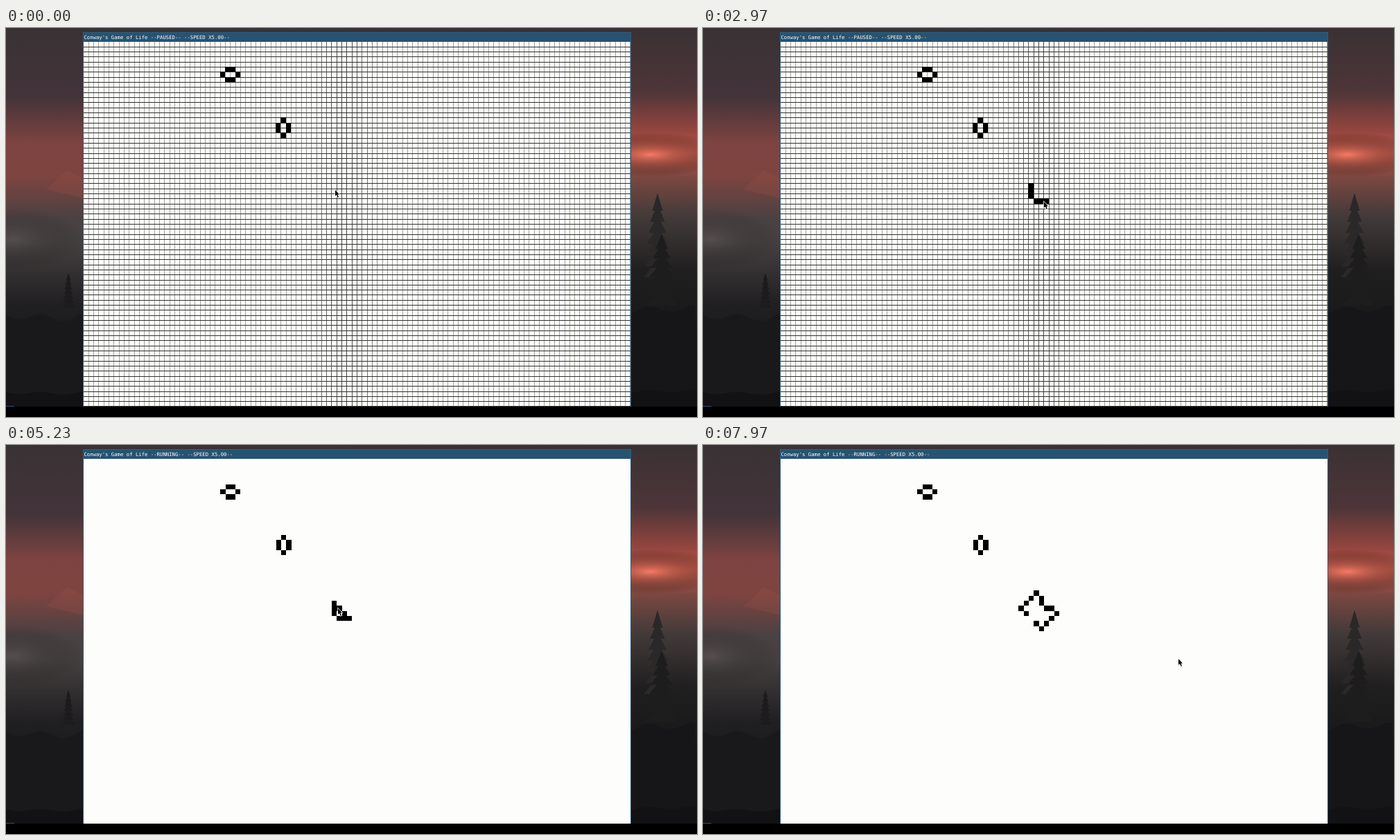
An HTML page with a canvas that plays this animation: 997 by 562 pixels, repeating every 8 s.

```html
<!DOCTYPE html>
<html lang="en">
<head>
<meta charset="utf-8">
<title>Game of Life</title>
<style>
  html, body { margin: 0; width: 100%; height: 100%; overflow: hidden; background: #000; }
  canvas { display: block; width: 997px; height: 562px; }
</style>
</head>
<body>
<canvas id="stage" width="997" height="562"></canvas>
<script>
const ctx = document.getElementById('stage').getContext('2d');

const LOOP = 8000, RUN_AT = 5100, STEP = 200, MOVE = 300;
const COLS = 108, ROWS = 72;
const LEFT = 112, TOP = 20, RIGHT = 901, BOTTOM = 547;
const CELL_W = (RIGHT - LEFT) / COLS, CELL_H = (BOTTOM - TOP) / ROWS;

// Stops of the pointer; a click fills the cell below it
const stops = [
  { t: 0, x: 475, y: 234 },
  { t: 500, x: 475, y: 228, click: true },
  { t: 850, x: 475, y: 235, click: true },
  { t: 1250, x: 475, y: 242, click: true },
  { t: 1600, x: 475, y: 249 },
  { t: 2000, x: 481, y: 250, click: true },
  { t: 2400, x: 487, y: 250, click: true },
  { t: 2800, x: 492, y: 251, click: true },
  { t: 3650, x: 487, y: 243, click: true },
  { t: 4250, x: 479, y: 236, click: true },
  { t: 6200, x: 686, y: 309 },
];

// A beehive is a ring of six cells, lying or standing
function beehive(x, y, standing) {
  const ring = [[1, 0], [2, 0], [0, 1], [3, 1], [1, 2], [2, 2]];
  return ring.map(([a, b]) => standing ? `${x + b},${y + a}` : `${x + a},${y + b}`);
}

function cellUnder({ x, y }) {
  return `${Math.floor((x - LEFT) / CELL_W)},${Math.floor((y - TOP) / CELL_H)}`;
}

function pausedCells(t) {
  const clicked = stops.filter(s => s.click && s.t <= t).map(cellUnder);
  return new Set([...beehive(27, 5), ...beehive(38, 15, true), ...clicked]);
}

function nextGeneration(cells) {
  const counts = new Map();
  for (const cell of cells) {
    const [x, y] = cell.split(',').map(Number);
    for (let dx = -1; dx <= 1; dx++)
      for (let dy = -1; dy <= 1; dy++) {
        if (!dx && !dy) continue;
        const key = `${x + dx},${y + dy}`;
        counts.set(key, (counts.get(key) || 0) + 1);
      }
  }
  return new Set([...counts.keys()].filter(key =>
    counts.get(key) === 3 || counts.get(key) === 2 && cells.has(key)));
}

const generations = [pausedCells(RUN_AT)];
while (generations.length <= (LOOP - RUN_AT) / STEP) generations.push(nextGeneration(generations.at(-1)));

function pointerAt(t) {
  let { x, y } = stops[0];
  for (const stop of stops) {
    const u = Math.min(1, Math.max(0, (t - stop.t + MOVE) / MOVE));
    const ease = stop.t ? u * u * (3 - 2 * u) : 1;
    x += (stop.x - x) * ease;
    y += (stop.y - y) * ease;
  }
  return [x, y];
}

function rect(color, x, y, w, h) {
  ctx.fillStyle = color;
  ctx.fillRect(x, y, w, h);
}

function polygon(color, points) {
  ctx.fillStyle = color;
  ctx.beginPath();
  for (const [x, y] of points) ctx.lineTo(x, y);
  ctx.fill();
}

function verticalGradient(stops) {
  const gradient = ctx.createLinearGradient(0, 0, 0, BOTTOM);
  for (const y in stops) gradient.addColorStop(y / BOTTOM, stops[y]);
  return gradient;
}

const leftSky = verticalGradient({ 0: '#393235', 100: '#43343a', 165: '#7d4340', 215: '#7d4440',
  275: '#4a4142', 310: '#454040', 400: '#201f21', 547: '#0e0d0f' });
const rightSky = verticalGradient({ 0: '#3a3134', 90: '#4d3538', 150: '#96463f', 180: '#cf6051',
  215: '#7c4841', 270: '#443b3a', 350: '#201f20', 547: '#0e0e0f' });

function glow(color, x, y, rx, ry) {
  ctx.save();
  ctx.translate(x, y);
  ctx.scale(rx, ry);
  const gradient = ctx.createRadialGradient(0, 0, 0, 0, 0, 1);
  gradient.addColorStop(0, color);
  gradient.addColorStop(1, 'transparent');
  rect(gradient, -1, -1, 2, 2);
  ctx.restore();
}

function tree(color, x, top, bottom, spread) {
  const tiers = 7, h = (bottom - top) / tiers;
  for (let i = 0; i < tiers; i++) {
    const w = spread * Math.sqrt((i + 1) / tiers), y = top + h * (i + 1);
    polygon(color, [[x, y - h * 1.6], [x + w, y], [x - w, y]]);
  }
}

function hills(color, x0, x1, y, height) {
  const points = [[x1, BOTTOM], [x0, BOTTOM]];
  for (let x = x0; x <= x1; x += 4) points.push([x, y + height * Math.sin(x / 17) * Math.cos(x / 29)]);
  polygon(color, points);
}

function drawWallpaper() {
  rect(leftSky, 0, 0, 500, BOTTOM);
  rect(rightSky, 500, 0, 497, BOTTOM);
  glow('#f87a64', 930, 183, 120, 32);
  glow('rgba(110,100,98,.4)', 10, 305, 100, 45);
  polygon('rgba(150,78,72,.3)', [[58, 233], [88, 205], [112, 218], [112, 246]]);
  tree('#2a2829', 940, 248, 360, 20);
  tree('#1d1d1e', 946, 306, 400, 24);
  tree('#1c1b1d', 90, 358, 404, 9);
  hills('#19191b', 0, 112, 414, 10);
  hills('#161618', 902, 997, 410, 10);
  hills('#121113', 0, 997, 526, 4);
  rect('#000', 0, BOTTOM, 997, 15);
  rect('#285577', 0, 546, 12, 1);
}

function drawWindow(paused) {
  rect('#315f7c', 111, 6, 791, 541);
  rect('#265373', 112, 7, 789, 13);
  ctx.fillStyle = '#fff';
  ctx.font = '7.29px "DejaVu Sans Mono", monospace';
  ctx.fillText(`Conway's Game of Life --${paused ? 'PAUSED' : 'RUNNING'}-- --SPEED X5.00--`, 112.4, 16);
  rect('#fdfdfc', LEFT, TOP, RIGHT - LEFT, BOTTOM - TOP);
}

// The grid sits on the last pixel before each cell boundary
const gridSnap = v => Math.ceil(v) - 1;

function drawGrid() {
  for (let c = 1; c <= COLS; c++) {
    const x = gridSnap(LEFT + c * CELL_W);
    const tone = 160 - 95 * Math.exp(-(((x - 487) / 38) ** 2));
    rect(`rgb(${tone},${tone},${tone - 6})`, x, TOP, 1, BOTTOM - TOP);
  }
  for (let r = 1; r <= ROWS; r++) rect('#30302e', LEFT, gridSnap(TOP + r * CELL_H), RIGHT - LEFT, 1);
}

function drawCells(cells, snap) {
  for (const cell of cells) {
    const [c, r] = cell.split(',').map(Number);
    const x = snap(LEFT + c * CELL_W), y = snap(TOP + r * CELL_H);
    rect('#000', x, y, snap(LEFT + (c + 1) * CELL_W) - x, snap(TOP + (r + 1) * CELL_H) - y);
  }
}

const arrow = new Path2D('M0 0V8.8L2 7L3.6 10.8L5 10.2L3.4 6.5H6Z');

function drawPointer(x, y) {
  ctx.save();
  ctx.translate(x, y);
  ctx.strokeStyle = '#fff';
  ctx.lineWidth = 1.4;
  ctx.stroke(arrow);
  ctx.fillStyle = '#000';
  ctx.fill(arrow);
  ctx.restore();
}

function draw(t) {
  const paused = t < RUN_AT;
  drawWallpaper();
  drawWindow(paused);
  if (paused) {
    drawGrid();
    drawCells(pausedCells(t), gridSnap);
  } else {
    drawCells(generations[Math.floor((t - RUN_AT) / STEP)], Math.round);
  }
  drawPointer(...pointerAt(t));
}

let start;
function tick(now) {
  start ??= now;
  draw((now - start) % LOOP);
  requestAnimationFrame(tick);
}
draw(0);
requestAnimationFrame(tick);
</script>
</body>
</html>
```
